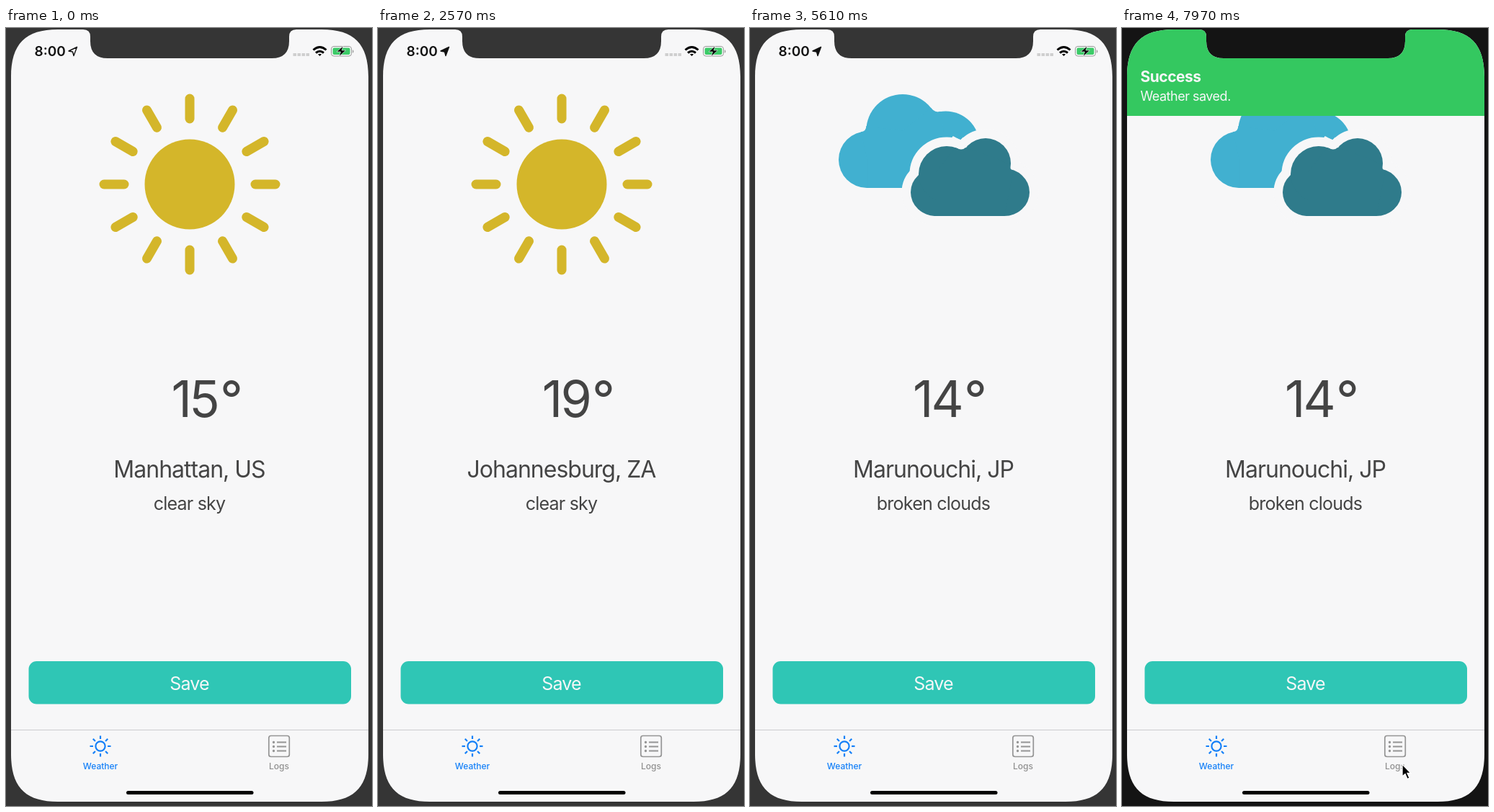
Recreate the animation shown at these times as an HTML page. Size 508 px wide and 1080 px high, loop 8 s.

```html
<!DOCTYPE html>
<html lang="en">
<head>
<meta charset="utf-8">
<title>Weather</title>
<style>
  html, body { margin: 0; width: 100%; height: 100%; overflow: hidden; }
  svg { display: block; width: 100vw; height: 100vh; font-family: Inter, "Open Sans", sans-serif; }
  .tight { letter-spacing: -.031em; }
  .mid { text-anchor: middle; }
  .cyan { fill: #41b0d0; }
  .page { fill: #f7f7f8; }
</style>
</head>
<body>
<svg viewBox="0 0 508 1080" preserveAspectRatio="none">
  <defs>
    <clipPath id="screen">
      <path d="M72 2H107Q117 2 117 12V18Q117 42 141 42H369Q393 42 393 18V12Q393 2 403 2H438C483 2 503 22 503 68V1008C503 1054 483 1074 438 1074H72C27 1074 7 1054 7 1008V68C7 22 27 2 72 2Z"/>
    </clipPath>
    <g id="cloud">
      <circle cx="183" cy="189" r="42"/>
      <circle cx="236" cy="146" r="54"/>
      <circle cx="300" cy="167" r="50"/>
      <circle cx="324" cy="189" r="42"/>
      <path d="M183 231V189L174 148Q182 147 182 139L236 146L278 112Q284 120 292 117.500L300 165L324 189V231Z"/>
    </g>
    <g id="smallCloud">
      <ellipse cx="258" cy="228" rx="35" ry="33"/>
      <circle cx="273" cy="203" r="39"/>
      <circle cx="327" cy="188" r="35"/>
      <ellipse cx="353" cy="228" rx="35" ry="33"/>
      <path d="M258 261V200L285 166Q294 171 299 166L340 180L361 190Q360 197 366 198L353 261Z"/>
    </g>
  </defs>
  <rect id="bezel" width="508" height="1080"/>
  <g clip-path="url(#screen)">
    <rect class="page" width="508" height="1080"/>

    <g id="sunny" fill="#d4b62a" stroke="#d4b62a">
      <circle cx="255" cy="217" r="62.5" stroke="none"/>
      <g id="rays" stroke-width="13" stroke-linecap="round"></g>
    </g>
    <g id="hazy" class="cyan">
      <use href="#cloud"/>
      <path d="M166.500 260H341.500M196.500 288H260.500M298.500 288H362.500M157.500 315H332" stroke="#41b0d0" stroke-width="13" stroke-linecap="round"/>
    </g>
    <g id="cloudy">
      <use href="#cloud" class="cyan" transform="translate(123 92) scale(.935) translate(-141 -92)"/>
      <use href="#smallCloud" class="page" stroke="#f7f7f8" stroke-width="25"/>
      <use href="#smallCloud" fill="#2f7b8b"/>
    </g>

    <g fill="#444">
      <text id="degrees" x="294" y="540" font-size="70" text-anchor="end" letter-spacing="-.04em"></text>
      <text x="297" y="540" font-size="70">°</text>
      <text id="place" class="mid tight" x="254.500" y="624" font-size="32"></text>
      <text id="sky" class="mid tight" x="254.500" y="669" font-size="25"></text>
    </g>

    <rect x="31.500" y="879" width="447.500" height="59.500" rx="11" fill="#2fc6b5"/>
    <text id="save" class="mid tight" x="254.500" y="918.500" font-size="25" fill="#f7f7f8">Save</text>

    <path d="M7 974.500H503" stroke="#cbcbcf"/>
    <g fill="none" stroke="#1580f8" stroke-width="2.2">
      <circle cx="131" cy="997" r="6.600"/>
      <g id="tabRays"></g>
    </g>
    <g fill="none" stroke="#959595" stroke-width="1.700">
      <rect x="364.800" y="982.500" width="28.500" height="29" rx="3"/>
      <path d="M376 991.500H389M376 997.500H389M376 1003.500H389" stroke-width="2"/>
      <path d="M371.500 991.500h0M371.500 997.500h0M371.500 1003.500h0" stroke-width="3.400" stroke-linecap="round"/>
    </g>
    <g class="mid" font-size="12" font-weight="500">
      <text x="131" y="1029" fill="#1580f8">Weather</text>
      <text x="379" y="1029" fill="#909090">Logs</text>
    </g>
    <path d="M169.500 1061.500H341" stroke="#000" stroke-width="5" stroke-linecap="round"/>

    <text x="39.500" y="39" font-size="19" font-weight="600" fill="#111">8:00</text>
    <path id="arrow" d="M98.500 26.500L87 32L92.500 33L94 38.500Z" stroke="#111" stroke-width="1.400" stroke-linejoin="round"/>
    <path d="M398.500 37H421" stroke="#cfcfcf" stroke-width="4" stroke-dasharray="4.500 1.500"/>
    <g fill="none" stroke="#000" stroke-width="3">
      <path d="M426.500 30.500Q435.500 22.500 444.500 30.500M430 34.500Q435.500 30 441 34.500"/>
      <path d="M433 36.500Q435.500 35 438 36.500L435.500 39Z" fill="#000" stroke="none"/>
    </g>
    <rect x="451.500" y="25.500" width="28" height="13.500" rx="3.500" fill="none" stroke="#999"/>
    <rect x="453.500" y="27.500" width="24" height="9.500" rx="2" fill="#3ccb68"/>
    <path d="M481 30V35Q484 32.500 481 30Z" fill="#999"/>
    <path d="M468 25L459 33H464.500L462.500 39.500L471.500 31H466Z" stroke="#f7f7f8" stroke-width=".600"/>

    <g id="banner" class="tight" fill="#f7f7f8">
      <rect y="-60" width="508" height="182" fill="#34c860"/>
      <text x="25.500" y="75" font-size="21" font-weight="700">Success</text>
      <text x="25.500" y="100.500" font-size="18">Weather saved.</text>
    </g>
  </g>
  <path id="cursor" d="M0 0V17L4 13.500L7 20.500L10 19L7 12.500H12Z" stroke="#fff" stroke-width="1.300"/>
</svg>
<script>
const LOOP = 8000;
const PRESS = 6430;
const BANNER = 6520;
const RELEASE = 6570;
const $ = id => document.getElementById(id);

const reports = [
  { from: 0, degrees: 15, place: "Manhattan, US", sky: "clear sky", icon: "sunny" },
  { from: 1100, degrees: 17, place: "London, GB", sky: "haze", icon: "hazy" },
  { from: 2300, degrees: 19, place: "Johannesburg, ZA", sky: "clear sky", icon: "sunny" },
  { from: 3400, degrees: 28, place: "Mumbai, IN", sky: "smoke", icon: "hazy" },
  { from: 4800, degrees: 14, place: "Marunouchi, JP", sky: "broken clouds", icon: "cloudy" }
];
const cursorPath = [[5950, 508, 760], [6350, 293, 897], [7000, 293, 897], [7700, 389, 1022]];

function rays(cx, cy, inner, outer, count) {
  return Array.from({ length: count }, (_, i) =>
    `<path d="M${cx} ${cy - inner}V${cy - outer}" transform="rotate(${i * 360 / count} ${cx} ${cy})"/>`).join("");
}
$("rays").innerHTML = rays(255, 217, 91, 119, 12);
$("tabRays").innerHTML = rays(131, 997, 10, 14.5, 8);

const progress = (t, start, length) => Math.min(1, Math.max(0, (t - start) / length));
const easeInOut = p => p < 0.5 ? 2 * p * p : 1 - 2 * (1 - p) ** 2;
const eased = (t, start, length) => easeInOut(progress(t, start, length));
const show = (id, on) => $(id).setAttribute("visibility", on ? "visible" : "hidden");

function cursorAt(t) {
  let [, x, y] = cursorPath[0];
  for (let i = 1; i < cursorPath.length; i++) {
    const [start, x0, y0] = cursorPath[i - 1];
    const [end, x1, y1] = cursorPath[i];
    if (t < start) break;
    const p = eased(t, start, end - start);
    x = x0 + (x1 - x0) * p;
    y = y0 + (y1 - y0) * p;
  }
  return [x, y];
}

function draw(t) {
  const report = reports.filter(r => t >= r.from).pop();
  for (const id of ["degrees", "place", "sky"]) {
    if ($(id).textContent !== String(report[id])) $(id).textContent = report[id];
  }
  for (const id of ["sunny", "hazy", "cloudy"]) show(id, id === report.icon);

  $("arrow").setAttribute("fill", t < reports[1].from ? "none" : "#111");
  $("bezel").setAttribute("fill", t < PRESS ? "#353535" : "#141414");

  const dimmed = eased(t, PRESS, RELEASE - PRESS) - eased(t, RELEASE, 250);
  $("save").setAttribute("opacity", 1 - 0.8 * dimmed);

  const slide = eased(t, BANNER, 225);
  $("banner").setAttribute("transform", `translate(0 ${-122 * (1 - slide)})`);
  show("banner", t >= BANNER);

  show("cursor", t >= cursorPath[0][0]);
  $("cursor").setAttribute("transform", `translate(${cursorAt(t)})`);
}

function tick() {
  draw(performance.now() % LOOP);
  requestAnimationFrame(tick);
}
tick();
</script>
</body>
</html>
```
